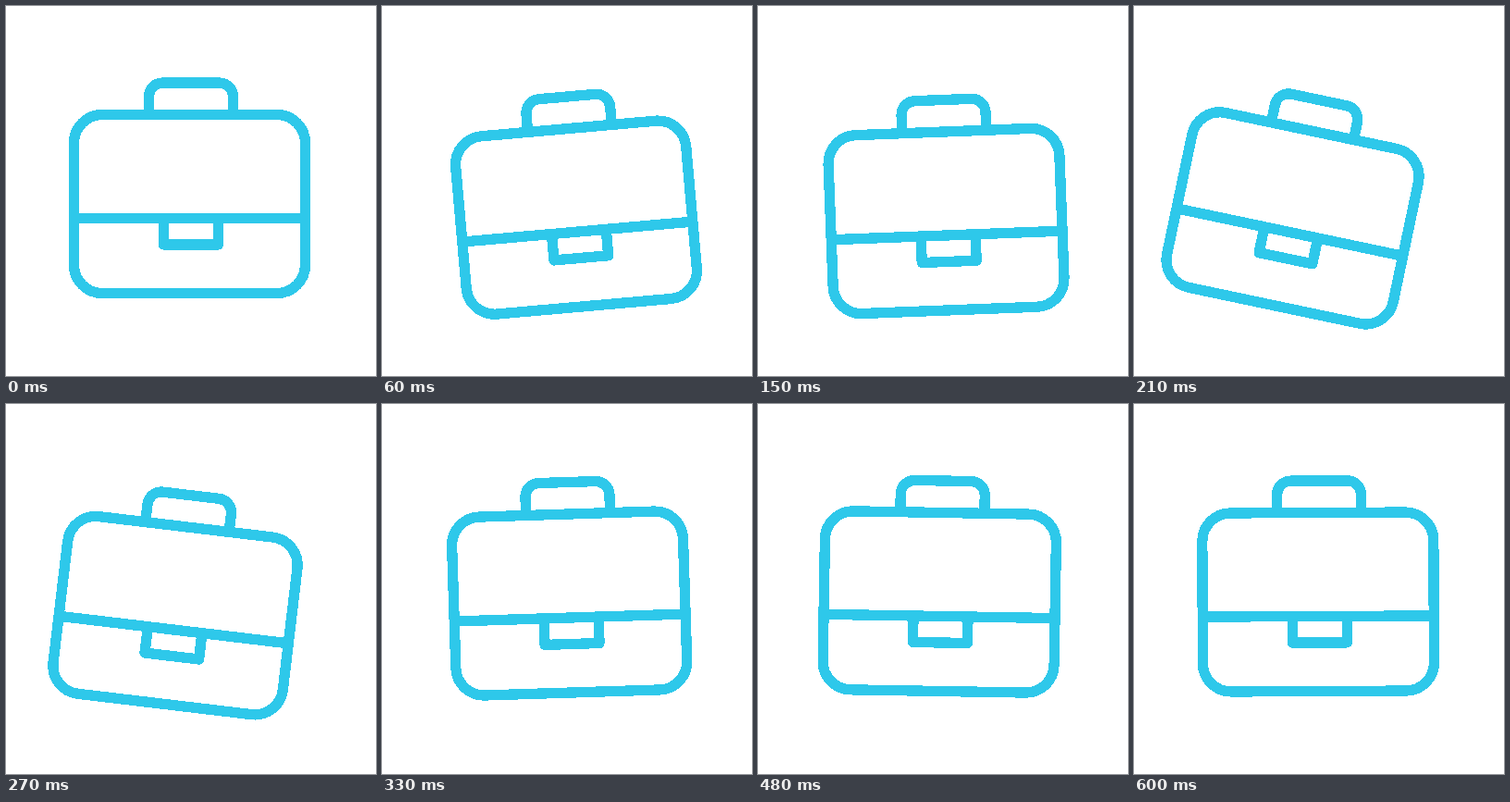
Write an HTML page that moves like this. It is 400 by 400 pixels and loops after 0.63 s.

```html
<!DOCTYPE html>
<html lang="en">
<head>
<meta charset="utf-8">
<title>Swinging briefcase</title>
<style>
  html, body { margin: 0; width: 100%; height: 100%; overflow: hidden; background: #fff; }
  svg { display: block; width: 100%; height: 100%; }
</style>
</head>
<body>
<svg viewBox="0 0 400 400" shape-rendering="crispEdges">
  <g id="briefcase" fill="none" stroke="#2ec8ea" stroke-width="11.3" stroke-linejoin="round">
    <rect x="73.5" y="117.5" width="250" height="193" rx="30.5"/>
    <path d="M73.5 229.5H323.5"/>
    <path d="M154.5 117.5V98a15 15 0 0 1 15-15h61a15 15 0 0 1 15 15v19.5"/>
    <path d="M170.5 229.5V258h59V229.5"/>
  </g>
</svg>
<script>
const LOOP = 630, STEP = 30;

// Turning points of the fading swing: time in ms, angle in degrees.
const SWING = [[0, 0], [110, -8.8], [215, 12], [350, -2.6], [445, 1.6], [550, -0.9], [LOOP, 0]];

// Eases from 0 to 1 while t goes from begin to end.
function ease(t, begin, end) {
  const p = Math.min(1, Math.max(0, (t - begin) / (end - begin)));
  return (1 - Math.cos(Math.PI * p)) / 2;
}

function angleAt(t) {
  const next = SWING.findIndex(([time]) => time > t);
  const [begin, from] = SWING[next - 1], [end, to] = SWING[next];
  return from + (to - from) * ease(t, begin, end);
}

const dropAt = t => 18.5 * (ease(t, 0, 84) - ease(t, 243, 350));

const briefcase = document.getElementById('briefcase');
const start = performance.now();

function draw() {
  const elapsed = Math.max(0, performance.now() - start) % LOOP;
  const t = Math.floor(elapsed / STEP) * STEP;
  // The case hangs from the middle of its handle.
  briefcase.setAttribute('transform', `translate(0 ${dropAt(t)}) rotate(${angleAt(t)} 200 83)`);
  requestAnimationFrame(draw);
}
draw();
</script>
</body>
</html>
```
